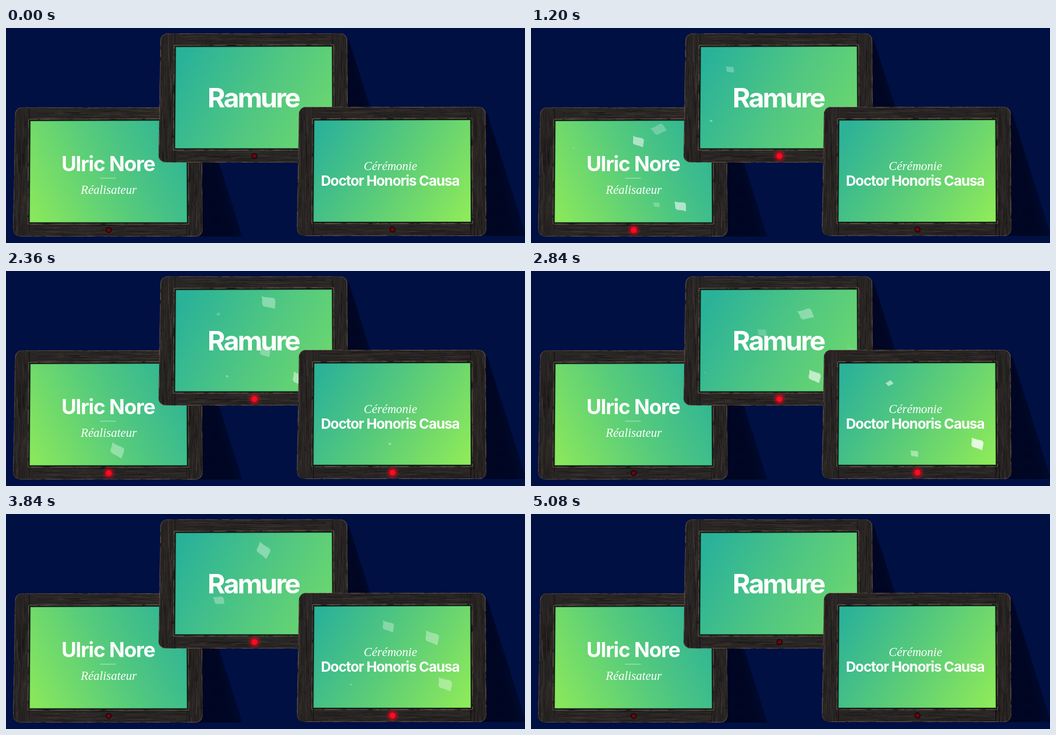
Animation, 960 px wide and 398 px high, one loop 5360 ms. Source, as an HTML page with a canvas:

```html
<!DOCTYPE html>
<html lang="fr">
<head>
<meta charset="utf-8">
<style>
html, body { margin: 0; width: 100%; height: 100%; overflow: hidden; background: #001043; }
canvas { display: block; }
</style>
</head>
<body>
<canvas id="stage" width="960" height="398"></canvas>
<script>
const ctx = document.getElementById('stage').getContext('2d');
const LOOP = 5360, STEP = 40, LIFE = 1000, MAX_SIZE = 27;
const SANS = 'Inter, sans-serif', SERIF = '"Liberation Serif", serif';
const OUTLINE = [[4, 1], [349, 1], [350.5, 240], [0, 240]];
const SCREEN = [[32, 26], [321, 25], [322, 214], [30.5, 214]];

// Leaf: x, y, size, angle, [opacity, x speed, y speed], as seen at the given time.
const tablets = [
  { x: 13, y: 146, led: [177, 228], on: 80, off: 2560,
    colors: ['#88e75d', '#56cb7c', '#2db397'], axis: [32, 190, 315, 45],
    leaves: {
      480: [[140, 250, 15, 5], [215, 300, 11, -15]],
      1200: [[79, 222, 5, -50, .28, .275, -.024], [236, 188, 24, -30, .25], [198, 210, 22, 12, .6],
        [276, 330, 22, 3, .65], [232, 327, 12, 0]],
      1880: [[90, 332, 10, 10], [202, 216, 22, 0, .5], [295, 340, 22, 5, .7]]
    } },
  { x: 282, y: 9, led: [177.5, 228], on: 720, off: 4080,
    colors: ['#2ab299', '#4fc682', '#6fd96d'], axis: [45, 50, 315, 200],
    leaves: {
      1200: [[368, 77, 15, 0], [333, 172, 5, -10, .7, .304, .022]],
      1880: [[370, 58, 10, -8], [427, 200, 13, 5, .45]],
      2200: [[440, 150, 14, 5]],
      2840: [[508, 80, 26, -18, .35], [427, 114, 17, 2, .25], [322, 188, 3, -9, .45, .302, .011],
        [524, 195, 24, 18, .65]],
      3400: [[370, 67, 10, 20]],
      3700: [[360, 160, 14, -10]]
    } },
  { x: 538, y: 145, led: [177, 228], on: 2000, off: 4960,
    colors: ['#2cb298', '#5bcc78', '#8dea5a'], axis: [45, 40, 310, 210],
    leaves: {
      2840: [[663, 208, 12, -30, .8, .295, -.004], [709, 338, 15, 3, .55, .204, .007], [825, 320, 24, 14, .85]],
      3400: [[601, 208, 5, 0], [682, 229, 18, 3], [706, 315, 12, 0]],
      4360: [[763, 316, 26, -18, .35], [698, 278, 17, 20, .25]]
    } }
];

let seed = 7;
const random = () => (seed = seed * 16807 % 2147483647) / 2147483647;
const clamp = v => Math.max(0, Math.min(1, v));

function polygon(g, points, radius = 0) {
  const mid = (a, b) => [(a[0] + b[0]) / 2, (a[1] + b[1]) / 2];
  g.beginPath();
  g.moveTo(...mid(points.at(-1), points[0]));
  points.forEach((p, i) => g.arcTo(...p, ...mid(p, points[(i + 1) % points.length]), radius));
  g.closePath();
}

function grain(g, count, x, y, w, h, vertical) {
  for (let i = 0; i < count; i++) {
    const length = 8 + random() * 50, thick = .4 + random();
    g.globalAlpha = .08 + random() * .24;
    g.fillStyle = random() < .55 ? '#0d0b0b' : '#5b5048';
    const px = x + random() * w, py = y + random() * h;
    vertical ? g.fillRect(px, py, thick, Math.min(length, y + h - py))
             : g.fillRect(px, py, Math.min(length, x + w - px), thick);
  }
  g.globalAlpha = 1;
}

function worn(g, points, radius, color) {
  g.strokeStyle = color;
  for (let i = 0; i < 4; i++) {
    g.setLineDash(Array.from({ length: 8 }, () => 3 + random() * 32));
    g.lineDashOffset = random() * 100;
    g.lineWidth = .8 + random() * 1.4;
    g.globalAlpha = .3 + random() * .3;
    polygon(g, points, radius);
    g.stroke();
  }
  g.setLineDash([]);
  g.globalAlpha = 1;
}

function buildTablet({ colors, axis }) {
  const layer = document.createElement('canvas');
  layer.width = 430;
  layer.height = 244;
  const g = layer.getContext('2d');

  const shade = g.createLinearGradient(345, 0, 412, -16);
  shade.addColorStop(0, 'rgba(0,2,18,.65)');
  shade.addColorStop(1, 'rgba(0,6,36,0)');
  g.fillStyle = shade;
  polygon(g, [[340, 12], [352, 12], [424, 240], [340, 240]]);
  g.fill();

  g.save();
  polygon(g, OUTLINE, 13);
  g.fillStyle = '#282524';
  g.fill();
  g.clip();
  grain(g, 230, 30, 1, 292, 24, false);
  grain(g, 230, 30, 214, 292, 26, false);
  grain(g, 260, 0, 0, 31, 240, true);
  grain(g, 260, 321, 0, 30, 240, true);
  g.fillStyle = 'rgba(0,0,0,.5)';
  for (const x of [30, 321]) g.fillRect(x, 0, 1, 240);
  worn(g, OUTLINE, 13, '#8a6c58');
  g.restore();

  const fill = g.createLinearGradient(...axis);
  colors.forEach((c, i) => fill.addColorStop(i / 2, c));
  polygon(g, SCREEN);
  g.strokeStyle = '#121110';
  g.lineWidth = 5;
  g.stroke();
  worn(g, [[29, 23], [324, 22], [325, 217], [27.5, 217]], 2, '#6d594b');
  polygon(g, SCREEN);
  g.fillStyle = fill;
  g.fill();
  g.strokeStyle = 'rgba(10,60,40,.55)';
  g.lineWidth = 1.5;
  g.stroke();
  return layer;
}

function drawLeaf(time, seen, [x, y, size, angle, opacity = .35, vx = .24, vy = 0]) {
  const dt = time - seen, age = dt + size * 25;
  if (age <= 0 || age >= LIFE) return;
  const s = Math.min(MAX_SIZE, age / 25);
  ctx.save();
  ctx.translate(x + vx * dt, y + vy * dt);
  ctx.rotate((angle + dt * .03) * Math.PI / 180);
  ctx.scale(s, s);
  ctx.globalAlpha = opacity * (.4 + .6 * s / MAX_SIZE) * clamp((LIFE - age) / 80);
  ctx.fillStyle = '#fff';
  ctx.beginPath();
  ctx.moveTo(-.52, -.38);
  ctx.quadraticCurveTo(-.3, -.3, .2, -.34);
  ctx.quadraticCurveTo(.48, -.34, .48, -.08);
  ctx.lineTo(.5, .39);
  ctx.quadraticCurveTo(.2, .32, -.15, .32);
  ctx.quadraticCurveTo(-.42, .32, -.42, .05);
  ctx.quadraticCurveTo(-.42, -.2, -.52, -.38);
  ctx.fill();
  ctx.restore();
}

function drawLed([x, y], level) {
  ctx.fillStyle = '#160607';
  circle(x, y, 5.5);
  ctx.fillStyle = '#71040f';
  circle(x, y, 3.8);
  if (!level) return;
  const glow = ctx.createRadialGradient(x, y, 4, x, y, 13);
  glow.addColorStop(0, 'rgba(255,0,25,.65)');
  glow.addColorStop(1, 'rgba(255,0,25,0)');
  ctx.globalAlpha = level;
  ctx.fillStyle = glow;
  circle(x, y, 13);
  ctx.fillStyle = '#ff0a1e';
  circle(x, y, 5.5);
  ctx.globalAlpha = 1;
}

function circle(x, y, r) {
  ctx.beginPath();
  ctx.arc(x, y, r, 0, 7);
  ctx.fill();
}

function label(text, x, y, font, spacing = 0) {
  ctx.font = font;
  ctx.letterSpacing = spacing + 'px';
  ctx.fillText(text, x + spacing / 2, y);
}

const captions = [
  () => {
    label('Ulric Nore', 189.5, 265, `700 38px ${SANS}`, -1.2);
    label('Réalisateur', 190, 307, `italic 22.5px ${SERIF}`);
    ctx.globalAlpha = .6;
    ctx.fillRect(174, 277.5, 29, 1);
    ctx.globalAlpha = 1;
  },
  () => label('Ramure', 459, 146.5, `700 50px ${SANS}`, -3),
  () => {
    label('Cérémonie', 711, 263, `italic 22.5px ${SERIF}`);
    label('Doctor Honoris Causa', 711, 291.5, `700 26px ${SANS}`, -1.1);
  }
];

const layers = tablets.map(buildTablet);

function draw(now) {
  const time = Math.floor(now % LOOP / STEP) * STEP;
  ctx.fillStyle = '#001043';
  ctx.fillRect(0, 0, 960, 398);
  ctx.textAlign = 'center';
  tablets.forEach((t, i) => {
    ctx.drawImage(layers[i], t.x, t.y);
    ctx.save();
    polygon(ctx, SCREEN.map(([x, y]) => [x + t.x, y + t.y]));
    ctx.clip();
    for (const seen in t.leaves)
      for (const leaf of t.leaves[seen]) drawLeaf(time, +seen, leaf);
    ctx.fillStyle = '#fff';
    captions[i]();
    ctx.restore();
    const level = Math.min(clamp((time - t.on) / 120), clamp((t.off - time) / 120));
    drawLed([t.x + t.led[0], t.y + t.led[1]], level);
  });
  requestAnimationFrame(draw);
}
requestAnimationFrame(draw);
</script>
</body>
</html>
```
